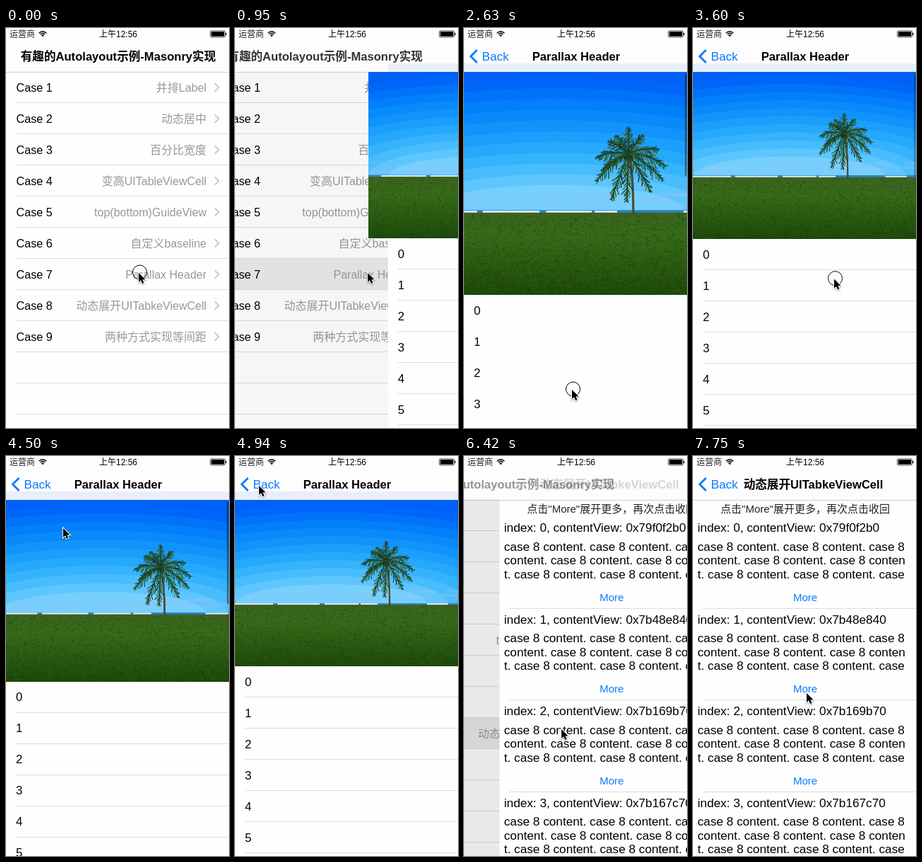
Animation, 316 px wide and 565 px high, one loop 8 s. Source, as an HTML page with a canvas:

```html
<!DOCTYPE html>
<html lang="zh">
<head>
<meta charset="utf-8">
<style>
html, body { margin: 0; width: 100%; height: 100%; overflow: hidden; background: #fff; }
canvas { display: block; width: 316px; height: 565px; }
</style>
</head>
<body>
<canvas id="stage"></canvas>
<script>
const W = 316, H = 565, LOOP = 8000;
const BAR = 62, HEADER = 235, ROW = 44;
const BLUE = '#0a7aff', LINE = '#dcdcde';
const FAMILY = '"Liberation Sans", "Noto Sans CJK SC", "Noto Sans CJK", sans-serif';

const canvas = document.getElementById('stage');
const dpr = window.devicePixelRatio || 1;
canvas.width = W * dpr;
canvas.height = H * dpr;
const ctx = canvas.getContext('2d');

const clamp = v => Math.max(0, Math.min(1, v));
const mix = (a, b, k) => a + (b - a) * k;
const smooth = k => k * k * (3 - 2 * k);
// Critically damped return from 1 to 0; t in ms, c per second.
const settle = (t, c) => t <= 0 ? 1 : (1 + c * t / 1000) * Math.exp(-c * t / 1000);

function track(keys, t) {
  let i = 0;
  while (i < keys.length - 2 && t >= keys[i + 1][0]) i++;
  const a = keys[i], b = keys[i + 1];
  const k = smooth(clamp((t - a[0]) / (b[0] - a[0])));
  return a.slice(1).map((v, n) => mix(v, b[n + 1], k));
}

function rect(x, y, w, h, color) {
  ctx.fillStyle = color;
  ctx.fillRect(x, y, w, h);
}

function text(str, x, y, size, color = '#000', align = 'left', weight = 'normal') {
  ctx.font = `${weight} ${size}px ${FAMILY}`;
  ctx.fillStyle = color;
  ctx.textAlign = align;
  ctx.textBaseline = 'alphabetic';
  ctx.fillText(str, x, y + size * 0.35);
}

function polyline(points, color, width) {
  ctx.beginPath();
  points.forEach(([x, y]) => ctx.lineTo(x, y));
  ctx.strokeStyle = color;
  ctx.lineWidth = width;
  ctx.stroke();
}

function seeded(seed) {
  return () => (seed = (seed * 16807) % 2147483647) / 2147483647;
}

// ---- Beach scene -------------------------------------------------------

const SCENE_W = 372;

function paintPalm(g, rnd) {
  const cx = 242, cy = 87;
  const greens = ['#12301a', '#1c4220', '#2b5224', '#4b6a30'];
  g.lineCap = 'round';
  g.strokeStyle = '#4b4a30';
  g.lineWidth = 2.4;
  g.beginPath();
  g.moveTo(247, 148);
  g.quadraticCurveTo(247, 112, cx + 1, cy);
  g.stroke();

  const tips = [[242, 59], [221, 73], [208, 90], [208, 115], [224, 134], [240, 136],
    [265, 126], [278, 114], [281, 99], [273, 82], [257, 67], [229, 67], [214, 104]];
  tips.forEach(([tx, ty]) => {
    const mx = (cx + tx) / 2, my = (cy + ty) / 2 - Math.abs(tx - cx) * 0.2;
    for (let i = 1; i <= 32; i++) {
      const k = i / 32, q = 1 - k;
      const x = q * q * cx + 2 * q * k * mx + k * k * tx;
      const y = q * q * cy + 2 * q * k * my + k * k * ty;
      const along = Math.atan2(q * (my - cy) + k * (ty - my), q * (mx - cx) + k * (tx - mx));
      const side = along + (i % 2 ? 1 : -1) * (0.5 + rnd() * 0.5);
      const len = (2 + 5 * Math.sin(Math.PI * k)) * (0.6 + rnd() * 0.7);
      g.strokeStyle = greens[Math.floor(rnd() * greens.length)];
      g.lineWidth = 0.9;
      g.beginPath();
      g.moveTo(x, y);
      g.lineTo(x + Math.cos(side) * len, y + Math.sin(side) * len + len * 0.3);
      g.stroke();
    }
    g.strokeStyle = greens[1];
    g.lineWidth = 1.3;
    g.beginPath();
    g.moveTo(cx, cy);
    g.quadraticCurveTo(mx, my, tx, ty);
    g.stroke();
  });
}

function paintScene() {
  const c = document.createElement('canvas');
  c.width = SCENE_W * 2;
  c.height = HEADER * 2;
  const g = c.getContext('2d'), rnd = seeded(71);
  g.scale(2, 2);

  g.fillStyle = '#0062f4';
  g.fillRect(0, 0, SCENE_W, 150);
  const bands = 11;
  for (let i = 0; i < bands; i++) {
    const k = i / (bands - 1);
    g.fillStyle = `rgb(${mix(0, 118, k ** 2.2)},${mix(102, 208, k ** 0.9)},${mix(250, 254, k)})`;
    g.beginPath();
    g.ellipse(165, 146, mix(420, 135, k), mix(140, 27, k), 0, 0, 7);
    g.fill();
  }

  for (let i = 0; i < 75; i++) {
    const x = rnd() * SCENE_W;
    g.fillStyle = `rgba(140,194,240,${0.12 + rnd() * 0.22})`;
    g.beginPath();
    g.ellipse(x, 127 + rnd() * 16, 5 + rnd() * 13, 1 + rnd() * 2, 0, 0, 7);
    g.fill();
  }

  g.fillStyle = '#2f7fc8';
  g.fillRect(0, 145.5, SCENE_W, 3);
  g.fillStyle = '#dcecf6';
  [[18, 64], [88, 60], [155, 48], [206, 24], [300, 30]].forEach(([x, w]) => g.fillRect(x, 146, w, 2));

  const grass = g.createLinearGradient(0, 148, 0, HEADER);
  grass.addColorStop(0, '#3c6420');
  grass.addColorStop(0.3, '#356a18');
  grass.addColorStop(1, '#1d480a');
  g.fillStyle = grass;
  g.fillRect(0, 148, SCENE_W, HEADER - 148);
  for (let i = 0; i < 7000; i++) {
    const y = 149 + rnd() * 86;
    g.fillStyle = rnd() < 0.5 ? 'rgba(14,46,4,.32)' : 'rgba(78,126,34,.25)';
    g.fillRect(rnd() * SCENE_W, y, 0.8 + rnd() * 1.6, 0.8);
  }
  paintPalm(g, rnd);
  return c;
}
const scene = paintScene();

// ---- Pages -------------------------------------------------------------

const cases = ['并排Label', '动态居中', '百分比宽度', '变高UITableViewCell', 'top(bottom)GuideView',
  '自定义baseline', 'Parallax Header', '动态展开UITabkeViewCell', '两种方式实现等间距'];

function drawList(selected, glow) {
  rect(0, BAR, W, H - BAR, '#fefefe');
  if (glow > 0) {
    ctx.globalAlpha = glow;
    rect(0, BAR + ROW * selected - 0.5, W, ROW, '#e8e9e9');
    ctx.globalAlpha = 1;
  }
  for (let i = 0; i < 11; i++) {
    const y = 84 + ROW * i;
    rect(15, y + 21, W - 15, 1, LINE);
    if (!cases[i]) continue;
    text(`Case ${i + 1}`, 14.5, y, 16.2);
    text(cases[i], 284, y, 16, '#98989b', 'right');
    polyline([[296, y - 5.5], [301.5, y], [296, y + 5.5]], '#c7c7cc', 1.8);
  }
}

function drawParallax(pull, bar, lines) {
  rect(0, 50, W, H - 50, '#fefefe');
  rect(0, 50, W, BAR - 50, '#e9effa');
  const h = HEADER + pull, w = SCENE_W * h / HEADER;
  ctx.drawImage(scene, W / 2 - w / 2, BAR, w, h);
  for (let i = 0; i < 7; i++) {
    const y = BAR + h + 22 + ROW * i;
    text(String(i), 14, y, 16.8);
    if (lines) rect(14, Math.round(y + 21), W - 14, 1, LINE);
  }
  if (bar > 0) rect(313, 65, 2.5, 145 - pull * 0.02, `rgba(0,0,0,${0.4 * bar})`);
}

const addresses = ['0x79f0f2b0', '0x7b48e840', '0x7b169b70', '0x7b167c70'];
const body = ['case 8 content. case 8 content. case 8',
  'content. case 8 content. case 8 conten',
  't. case 8 content. case 8 content. case'];

function drawExpand() {
  rect(0, BAR, W, H - BAR, '#fefefe');
  text('点击"More"展开更多，再次点击收回', 159, 74.5, 15, '#222', 'center');
  addresses.forEach((address, i) => {
    const y = 101 + 129.5 * i;
    text(`index: ${i}, contentView: ${address}`, 6.5, y, 17.2);
    body.forEach((line, n) => text(line, 6.5, y + 26.5 + 19.7 * n, 17.2));
    text('More', 159, y + 98.5, 15, BLUE, 'center');
    rect(14, Math.floor(y + 114), W - 14, 1, LINE);
  });
}

// ---- Chrome ------------------------------------------------------------

function drawStatus() {
  text('运营商', 5, 8.5, 12, '#222');
  text('上午12:56', 159, 8.5, 12, '#000', 'center', '500');
  ctx.strokeStyle = '#000';
  ctx.lineWidth = 1.5;
  [7, 4.4].forEach(r => {
    ctx.beginPath();
    ctx.arc(52, 12, r, -Math.PI * 0.77, -Math.PI * 0.23);
    ctx.stroke();
  });
  ctx.fillStyle = '#000';
  ctx.beginPath();
  ctx.moveTo(52, 12.5);
  ctx.arc(52, 12, 2.6, -Math.PI * 0.77, -Math.PI * 0.23);
  ctx.fill();

  ctx.lineWidth = 0.7;
  ctx.beginPath();
  ctx.roundRect(289.5, 4, 21, 9, 1.8);
  ctx.stroke();
  rect(290.8, 5.2, 18.4, 6.6, '#000');
  rect(311.3, 6.8, 1.2, 3.4, '#000');
}

function drawTitles(p, listAlpha, pageAlpha, title) {
  ctx.globalAlpha = listAlpha;
  text('有趣的Autolayout示例-Masonry实现', 159 - 100 * p, 40, 16.6, '#000', 'center', 'bold');
  ctx.globalAlpha = pageAlpha;
  text(title, (title === cases[6] ? 159 : 170.5) + 222 * (1 - p), 40, 16.6, '#000', 'center', 'bold');
  ctx.globalAlpha = pageAlpha ** 2;
  text('Back', 25.5 + 90 * (1 - p), 40, 17.2, BLUE);
  polyline([[18.5, 31], [9.5, 40], [18.5, 49]], BLUE, 2.8);
  ctx.globalAlpha = 1;
}

const arrow = [[0, 0], [0, 13], [3, 10.3], [5.2, 15], [7.5, 14], [5.4, 9.5], [9.4, 9.3]];

function drawPointer(x, y, pressed) {
  if (pressed) {
    ctx.strokeStyle = '#000';
    ctx.lineWidth = 1;
    ctx.beginPath();
    ctx.arc(x + 1.5, y - 1, 10, 0, 7);
    ctx.stroke();
  }
  ctx.save();
  ctx.translate(x, y);
  ctx.beginPath();
  arrow.forEach(([ax, ay]) => ctx.lineTo(ax, ay));
  ctx.closePath();
  ctx.shadowColor = 'rgba(0,0,0,.4)';
  ctx.shadowBlur = 2 * dpr;
  ctx.shadowOffsetY = dpr;
  ctx.strokeStyle = '#fff';
  ctx.lineWidth = 2;
  ctx.stroke();
  ctx.shadowColor = 'transparent';
  ctx.fillStyle = '#000';
  ctx.fill();
  ctx.restore();
}

// ---- Timeline ----------------------------------------------------------

const PUSH = 880, POP = 5158, PUSH2 = 6215;
const LET_GO = 3040, LET_GO2 = 4290;

const pointer = [[0, 188, 346], [1400, 188, 346], [1650, 187, 326], [1910, 182, 277], [2130, 182, 277],
  [2630, 153, 511], [3070, 153, 511], [3590, 200, 354], [3620, 200, 356], [4050, 165, 534],
  [4290, 165, 534], [4500, 81, 102], [4850, 34, 42], [5130, 34, 42], [5450, 130, 262],
  [5880, 141, 388], [5990, 141, 388], [6070, 138, 386], [6400, 138, 386], [6950, 160, 388],
  [7350, 188, 146], [7720, 161, 335], [8000, 161, 335]];
const presses = [[0, 90], [1900, LET_GO], [3590, LET_GO2], [4960, 5110], [5890, 5980]];

function pullAt(t) {
  if (t < LET_GO) return track([[2130, 0], [2620, 80.4]], t)[0];
  if (t < 3600) return 80.4 * settle(t - LET_GO, 11);
  if (t < LET_GO2) return track([[3600, 1], [4050, 66]], t)[0];
  return 66 * settle(t - LET_GO2, 11);
}

function barAt(t) {
  const shown = (a, b) => clamp((t - a) / 100) * clamp((b - t) / 250);
  return Math.max(shown(2130, 3750), shown(3590, 4950));
}

function render(t) {
  const second = t >= PUSH2;
  const popping = t >= POP && !second;
  const started = second ? PUSH2 : popping ? POP : PUSH;
  const dt = t - started;
  const rest = settle(dt, 16);
  const p = popping ? rest : 1 - rest;
  const fadeIn = clamp((dt - 150) / 350), fadeOut = clamp(1 - dt / 350);
  const glow = dt < 0 ? 0 : popping ? clamp(1 - (dt - 330) / 450) : 1;

  ctx.setTransform(dpr, 0, 0, dpr, 0, 0);
  rect(0, 0, W, H, '#fdfdfd');

  ctx.save();
  ctx.translate(-W * 0.3 * p, 0);
  drawList(second ? 7 : 6, glow);
  ctx.restore();
  if (p > 0) rect(0, BAR, W, H - BAR, `rgba(0,0,0,${0.1 * p})`);
  rect(0, BAR, W, 0.7, '#b8b8ba');

  if (p > 0.001) {
    ctx.save();
    ctx.translate(p > 0.996 ? 0 : W * (1 - p), 0);
    if (second) drawExpand();
    else drawParallax(pullAt(t), barAt(t), t < 2600 || t > LET_GO + 30);
    ctx.restore();
    if (second) rect(0, BAR, W, 0.7, '#b8b8ba');
  }

  drawTitles(p, popping ? fadeIn : fadeOut, popping ? fadeOut : fadeIn, cases[second ? 7 : 6]);
  drawStatus();
  const [x, y] = track(pointer, t);
  drawPointer(x, y, presses.some(([a, b]) => t >= a && t < b));
}

const begin = performance.now();
function tick() {
  render((performance.now() - begin) % LOOP);
  requestAnimationFrame(tick);
}
tick();
</script>
</body>
</html>
```
